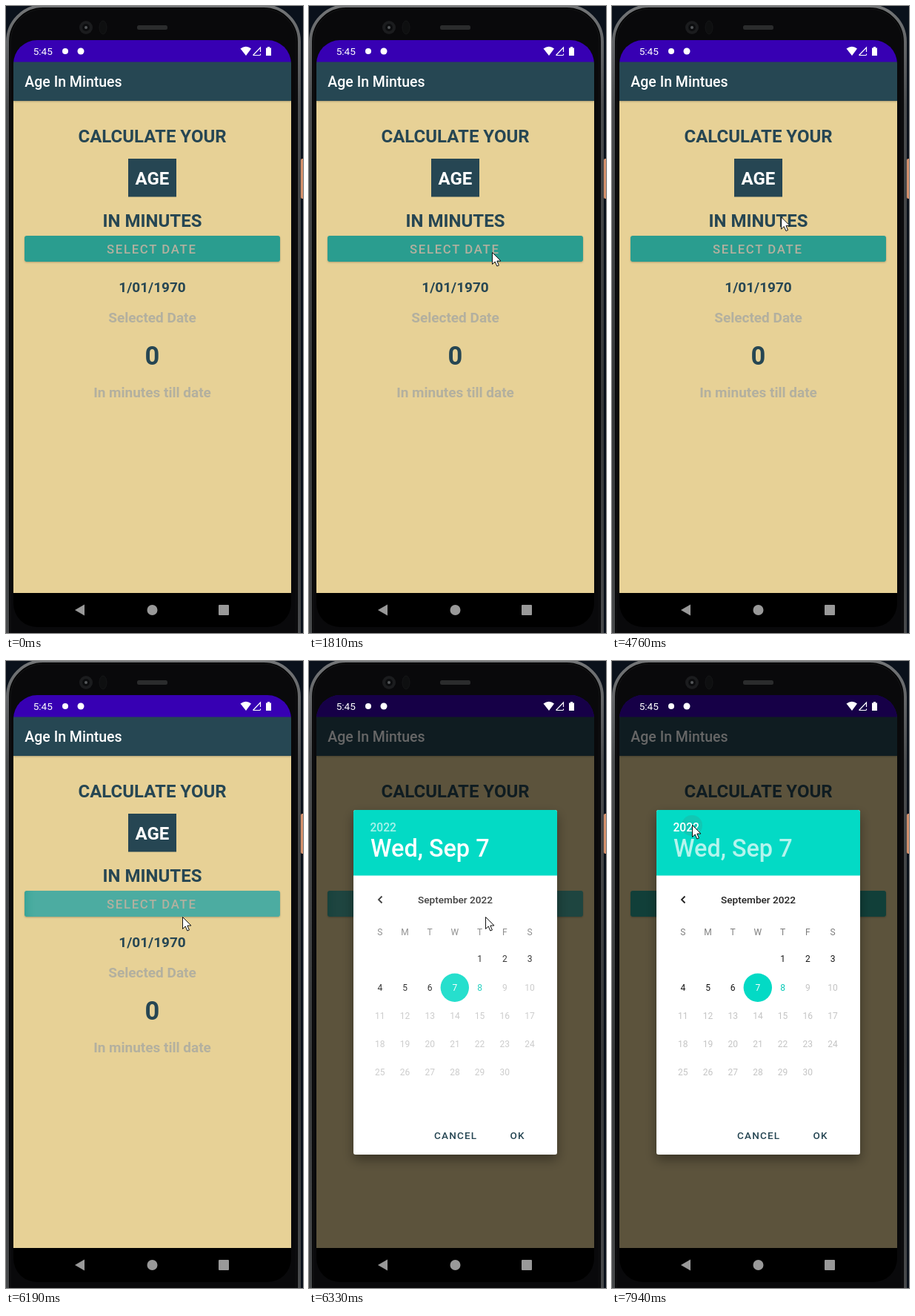
An HTML page for the animation above (8 s loop, 401 by 846 pixels).

```html
<!DOCTYPE html>
<html lang="en">
<head>
<meta charset="utf-8">
<title>Age calculator</title>
<style>
html, body { margin: 0; width: 100%; height: 100%; overflow: hidden; background: #0a111b; }
svg { display: block; font-family: Roboto, sans-serif; }
.mid { text-anchor: middle; }
.bold { font-weight: 700; }
.medium { font-weight: 500; }
.dark { fill: #264653; }
.hint { fill: #b3b09f; }
</style>
</head>
<body>
<svg width="401" height="846" viewBox="0 0 401 846">
  <defs>
    <linearGradient id="rim" x2="0" y2="1">
      <stop stop-color="#737577"/><stop offset=".15" stop-color="#4a4c4e"/>
      <stop offset=".6" stop-color="#363839"/><stop offset="1" stop-color="#4a4c4e"/>
    </linearGradient>
    <clipPath id="screen"><rect x="10" y="46" width="375" height="792" rx="32"/></clipPath>
    <clipPath id="buttonClip"><rect x="25" y="310" width="345" height="35" rx="3"/></clipPath>
    <filter id="low" x="-10%" y="-30%" width="120%" height="180%">
      <feDropShadow dx="0" dy="1" stdDeviation="1" flood-opacity=".25"/>
    </filter>
    <filter id="high" x="-20%" y="-15%" width="140%" height="135%">
      <feDropShadow dx="0" dy="7" stdDeviation="8" flood-opacity=".36"/>
    </filter>
    <filter id="soft"><feGaussianBlur stdDeviation="7"/></filter>
  </defs>

  <!-- phone body -->
  <rect x="398" y="206" width="6" height="54" rx="2" fill="#d4906c"/>
  <rect x="2" y="0" width="394" height="900" rx="48" fill="#050506" stroke="url(#rim)" stroke-width="4"/>
  <rect x="6" y="4" width="386" height="900" rx="44" fill="#09090b" stroke="#141516"/>
  <circle cx="108" cy="29" r="9" fill="#1b1c1e"/>
  <circle cx="108" cy="29" r="5" fill="#0c0d0f"/>
  <circle cx="108" cy="29" r="2" fill="#57595c"/>
  <ellipse cx="131" cy="29" rx="5" ry="9" fill="#0e0f10" stroke="#151617"/>
  <rect x="177" y="26" width="41" height="6" rx="2.5" fill="#2b2c2d"/>

  <g clip-path="url(#screen)">
    <rect x="10" y="46" width="375" height="792"/>
    <rect x="10" y="128" width="375" height="664" fill="#e7d196"/>
    <rect x="10" y="75" width="375" height="53" fill="#264653" filter="url(#low)"/>
    <rect x="10" y="46" width="375" height="29.5" fill="#3700b3"/>
    <text x="25.3" y="109" class="medium" font-size="19.5" fill="#fff">Age In Mintues</text>

    <g class="mid bold dark" font-size="24">
      <text x="197.5" y="184">CALCULATE YOUR</text>
      <rect x="165" y="206" width="65" height="51.5"/>
      <text x="197.5" y="241" fill="#fff">AGE</text>
      <text x="197.5" y="298">IN MINUTES</text>
    </g>

    <rect x="25" y="310" width="345" height="35" rx="3" fill="#2a9d8f" filter="url(#low)"/>
    <g clip-path="url(#buttonClip)">
      <circle id="press" cx="246" cy="329" r="0" fill="#fff" filter="url(#soft)"/>
    </g>
    <text x="136" y="334" font-size="16.8" letter-spacing="1.65" class="medium hint">SELECT DATE</text>

    <g class="mid bold" font-size="19">
      <text x="197.5" y="386" class="dark">1/01/1970</text>
      <text x="197.5" y="427" class="hint">Selected Date</text>
      <text x="197.5" y="484" class="dark" font-size="34.5">0</text>
      <text x="197.5" y="528" class="hint">In minutes till date</text>
    </g>

    <rect id="dim" x="10" y="46" width="375" height="746"/>

    <!-- status bar -->
    <g fill="#fff">
      <text x="36.7" y="66" font-size="13.6">5:45</text>
      <circle cx="80" cy="61" r="4"/>
      <circle cx="101" cy="61" r="4.5"/>
      <path d="M316.5 57.5Q324 52 331 57.5L324 67Z"/>
      <path d="M333.5 66.5H343M333.5 66.5L343.5 56V62M343.5 64.5V66.5" fill="none" stroke="#fff" stroke-width="1.2"/>
      <path d="M351 56.5H353V55H356V56.5H358V67H351Z"/>
    </g>

    <!-- navigation bar -->
    <g fill="#999">
      <path d="M93 815L106 807.5V822.5Z"/>
      <circle cx="197.5" cy="815" r="7"/>
      <rect x="287" y="808" width="14" height="14" rx="1"/>
    </g>
  </g>

  <g id="dialog">
    <rect x="60" y="201" width="275" height="465" rx="3" fill="#fff" filter="url(#high)"/>
    <path d="M60 289.5V204Q60 201 63 201H332Q335 201 335 204V289.5Z" fill="#03dac5"/>
    <circle id="yearPress" cx="108" cy="222" r="0" fill="#3b8f85" opacity=".25"/>
    <g class="medium" fill="#fff">
      <text id="year" x="82.5" y="230" font-size="15.6">2022</text>
      <text id="date" x="83" y="264" font-size="32.4">Wed, Sep 7</text>
    </g>
    <g id="month" class="mid" font-size="12">
      <path d="M98.5 317.5L94 322L98.5 326.5" fill="none" stroke="#222" stroke-width="1.8"/>
      <text x="197.5" y="327" class="medium" font-size="13.6" fill="#222">September 2022</text>
      <circle cx="196.8" cy="440.7" r="19.2" fill="#03dac5"/>
    </g>
    <g class="medium dark" font-size="13.5" letter-spacing="1.2">
      <text x="169" y="644.5">CANCEL</text>
      <text x="271.5" y="644.5">OK</text>
    </g>
  </g>

  <path id="cursor" d="M.5 .5V16.5L4.2 13L6.8 19L9.4 18L6.9 12H12Z" fill="#fff" stroke="#111"/>
</svg>

<script>
const LOOP = 8000, STEP = 70;
const $ = id => document.getElementById(id);
const progress = (t, start, length) => Math.max(0, Math.min(1, (t - start) / length));
const easeOut = u => 1 - (1 - u) ** 2;

// Calendar grid
function addCell(text, column, y, fill) {
  const cell = document.createElementNS('http://www.w3.org/2000/svg', 'text');
  cell.setAttribute('x', 95.8 + 33.7 * column);
  cell.setAttribute('y', y);
  cell.setAttribute('fill', fill);
  cell.textContent = text;
  $('month').append(cell);
}

function dayColor(day) {
  if (day === 7) return '#fff';
  if (day === 8) return '#03c9b6';
  return day > 8 ? '#c4c4c4' : '#151515';
}

[...'SMTWTFS'].forEach((name, i) => addCell(name, i, 370, '#7d7d7d'));
for (let day = 1; day <= 30; day++) {
  const slot = day + 3;
  addCell(day, slot % 7, 406.3 + 38.25 * Math.floor(slot / 7), dayColor(day));
}

// Pointer sweeps: each eases to a point along a path bowed sideways
const entry = { x: 392, y: 812 };
const sweeps = [
  { start: 320, end: 1020, x: 247, y: 332, bowX: -15 },
  { start: 2810, end: 3580, x: 91, y: 198, bowY: -110 },
  { start: 3710, end: 4480, x: 222, y: 254, bowX: 118, bowY: -30 },
  { start: 4550, end: 5110, x: 232, y: 304 },
  { start: 5370, end: 5440, x: 246, y: 329 },
  { start: 6050, end: 6190, x: 238, y: 345 },
  { start: 6400, end: 7660, x: 108, y: 221, bowX: -22 }
];

function pointer(t) {
  let { x, y } = entry;
  for (const s of sweeps) {
    const u = easeOut(progress(t, s.start, s.end - s.start));
    const bow = Math.sin(Math.PI * u);
    x += (s.x - x) * u + (s.bowX || 0) * bow;
    y += (s.y - y) * u + (s.bowY || 0) * bow;
  }
  return [x, y];
}

function snap(t) {
  const sweep = sweeps.findLast(s => s.start <= t);
  return sweep ? sweep.start + Math.floor((t - sweep.start) / STEP) * STEP : 0;
}

function draw(now) {
  const t = snap(now % LOOP);
  $('cursor').style.display = t < sweeps[0].start ? 'none' : '';
  $('cursor').setAttribute('transform', `translate(${pointer(t)})`);

  $('press').setAttribute('r', t >= 6050 ? 70 + 150 * progress(t, 6050, 140) : 0);
  $('press').setAttribute('opacity', 0.16 * (1 - progress(t, 6330, 210)));

  const open = progress(t, 6190, 140);
  $('dim').setAttribute('opacity', 0.6 * open);
  $('dialog').setAttribute('opacity', open);
  $('month').setAttribute('opacity', 0.86 + 0.14 * progress(t, 6330, 140));

  const picked = t >= 7870;
  $('year').setAttribute('opacity', picked ? 1 : 0.65);
  $('date').setAttribute('opacity', picked ? 0.7 : 1);
  $('yearPress').setAttribute('r', t >= 7800 ? 5 + 9 * progress(t, 7800, 140) : 0);
}

const start = performance.now();
(function frame() {
  draw(performance.now() - start);
  requestAnimationFrame(frame);
})();
</script>
</body>
</html>
```
